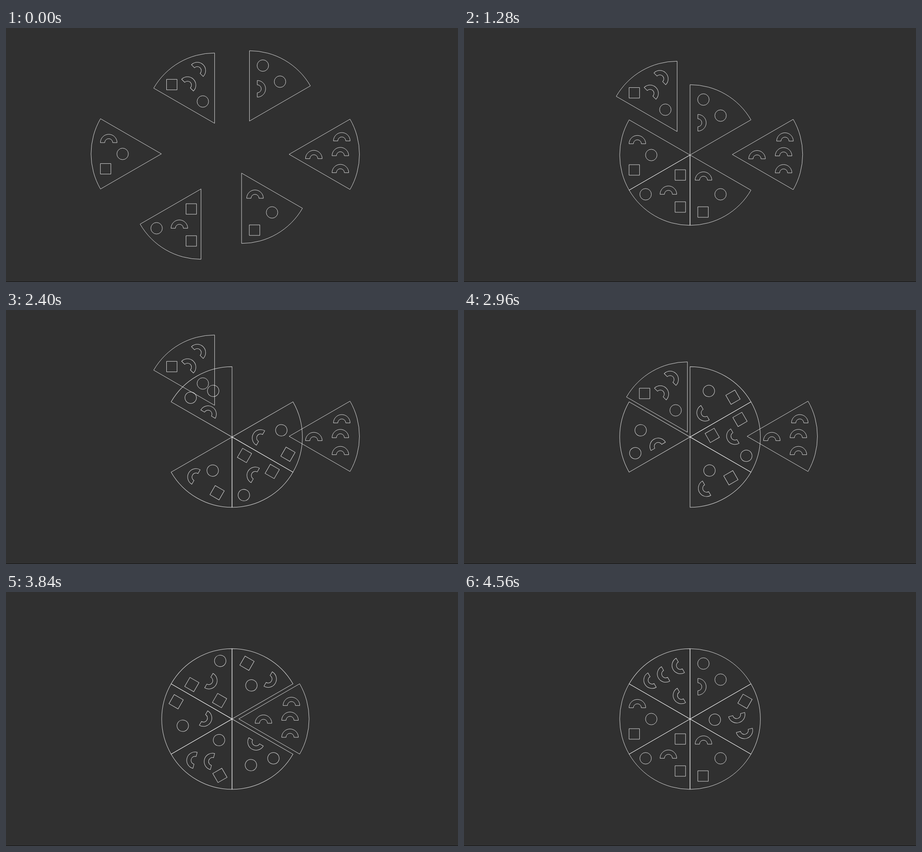
Write an HTML page with a canvas that moves like this. It is 998x561 px and loops after 5.76 s.

```html
<!DOCTYPE html>
<html lang="en">
<head>
<meta charset="utf-8">
<title>Pizza slices</title>
<style>
  html, body { margin: 0; width: 100%; height: 100%; overflow: hidden; background: #303030; }
  canvas { display: block; width: 100%; height: 100%; }
</style>
</head>
<body>
<canvas id="stage" width="998" height="561"></canvas>
<script>
const ctx = document.getElementById('stage').getContext('2d');
const LOOP = 5760, STEP = 80;
const CX = 499.1, CY = 280.5, RADIUS = 155.3;
const rad = deg => deg * Math.PI / 180;

// Toppings, placed relative to the slice tip
const ring = (x, y) => ({ x, y, draw() { ctx.arc(0, 0, 12.7, 0, 2 * Math.PI); } });
const box = (x, y) => ({ x, y, draw() { ctx.rect(-11.6, -11.6, 23.2, 23.2); } });
const arch = (x, y, turn = 0) => ({
  x, y, turn,
  draw() {
    ctx.arc(0, 0, 18.4, Math.PI, 0);
    ctx.arc(0, 0, 8.8, 0, Math.PI, true);
    ctx.closePath();
  }
});

// from: start angle, away: offset when spread out, swap: pie angle at which the slice rejoins
const slices = [
  { from: -90, away: [38.5, -75],
    items: [ring(29.5, -122.5), ring(67.4, -87), arch(17.2, -71.2, 90)] },
  { from: -30, away: [126, -1.5], swap: -240,
    items: [arch(116.3, -29.6), arch(113.2, 3.1), arch(113.2, 40.6), arch(54.6, 9.6)] },
  { from: 30, away: [21, 40],
    items: [arch(29.7, 55.6), ring(67.3, 86.8), box(28.7, 126)] },
  { from: 90, away: [-68.5, 75],
    items: [box(-21.5, 44.2), box(-21.5, 114.9), ring(-98.1, 86.8), arch(-47.8, 86.8)] },
  { from: 150, away: [-156, -2.5],
    items: [arch(-116.3, -24.8), ring(-85.6, 0.1), box(-123.1, 33)] },
  { from: 210, away: [-38.5, -70], swap: -120,
    items: [box(-94.5, -85.5), ring(-26, -48.2), arch(-38.2, -116.4, 45), arch(-59.8, -84.3, 45)] }
];

const span = (t, start, end) => Math.min(1, Math.max(0, (t - start) / (end - start)));
const easeOut = u => 1 - (1 - u) ** 3;
const easeInOut = u => (1 - Math.cos(Math.PI * u)) / 2;
const slide = (t, start, end) => easeOut(span(t, start, end));
const spin = (t, start, end) => -120 * easeInOut(span(t, start, end));

function drawSlice(slice, spread, angle) {
  ctx.save();
  ctx.translate(CX + slice.away[0] * spread, CY + slice.away[1] * spread);
  ctx.rotate(rad(angle));
  ctx.beginPath();
  ctx.moveTo(0, 0);
  ctx.arc(0, 0, RADIUS, rad(slice.from), rad(slice.from + 60));
  ctx.closePath();
  ctx.stroke();
  for (const item of slice.items) {
    ctx.save();
    ctx.translate(item.x, item.y);
    ctx.rotate(rad(item.turn || 0));
    ctx.beginPath();
    item.draw();
    ctx.stroke();
    ctx.restore();
  }
  ctx.restore();
}

function render(t) {
  ctx.fillStyle = '#303030';
  ctx.fillRect(0, 0, 998, 561);
  ctx.fillStyle = '#141414';
  ctx.fillRect(0, 560, 998, 1);
  ctx.strokeStyle = 'rgba(255, 255, 255, 0.8)';
  ctx.lineWidth = 1;

  const gather = 1 - slide(t, 242, 987);
  const leave = slide(t, 992, 1787);
  const pie = spin(t, 2050, 2750) + spin(t, 3200, 3590) + spin(t, 4101, 4551);

  for (const slice of slices) {
    let spread = gather, angle = pie;
    if (slice.swap) {
      const back = slice.swap === -120 ? slide(t, 2750, 3200) : slide(t, 3590, 4080);
      spread += leave - back;
      angle = Math.min(0, pie - slice.swap);
    }
    drawSlice(slice, spread, angle);
  }
}

function tick() {
  const t = performance.now() % LOOP;
  render(Math.floor(t / STEP) * STEP);
  requestAnimationFrame(tick);
}
tick();
</script>
</body>
</html>
```
